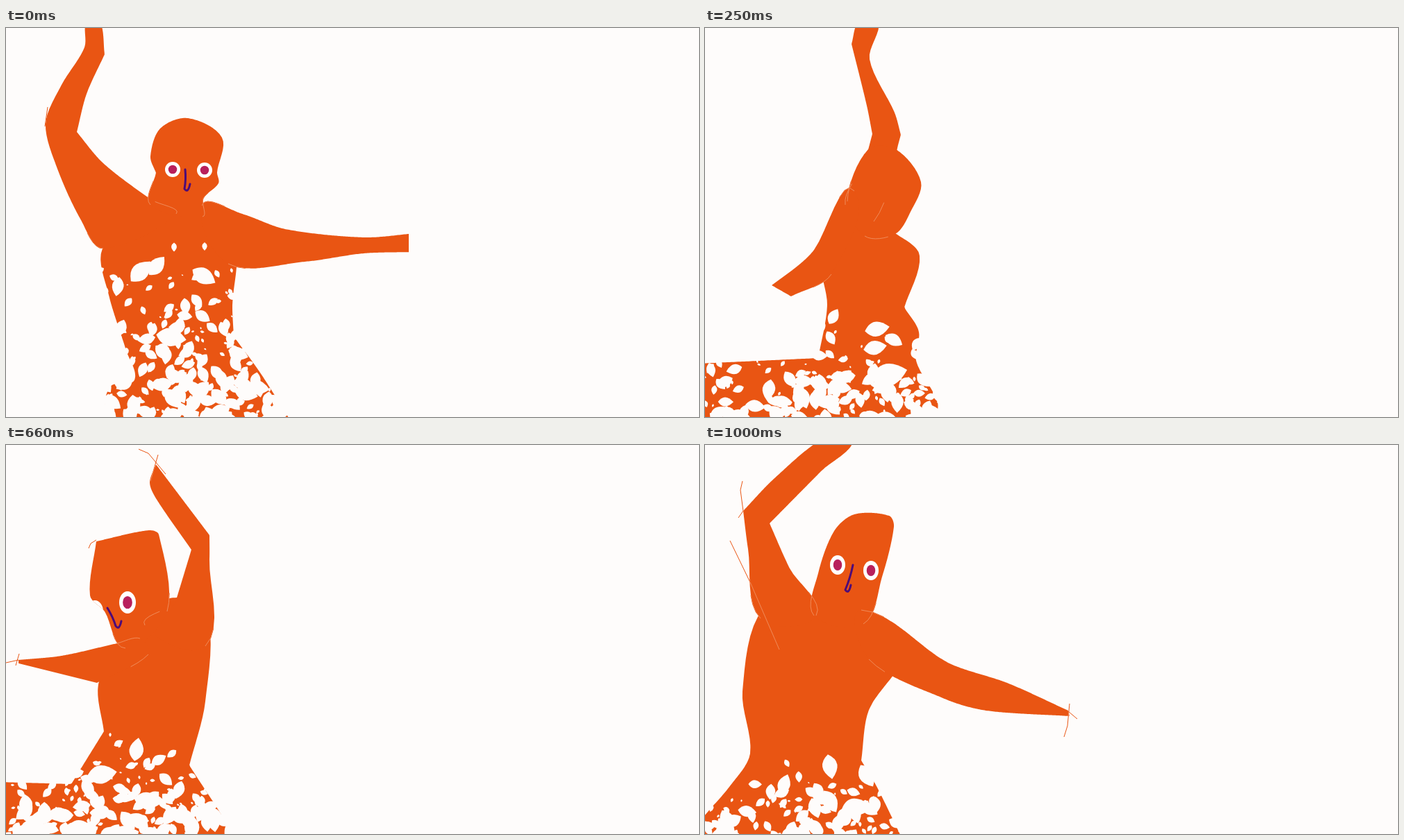
These frames come from a looping animation (998 by 561 pixels, 1.08 s). An HTML page with a canvas:

```html
<!DOCTYPE html>
<html lang="en">
<head>
<meta charset="utf-8">
<title>Turning dancer</title>
<style>
html, body { margin: 0; width: 100%; height: 100%; overflow: hidden; background: #fefcfb; }
canvas { display: block; }
</style>
</head>
<body>
<canvas id="stage" width="998" height="561"></canvas>
<script>
const ctx = document.getElementById('stage').getContext('2d');
const ORANGE = '#e95513', CREASE = '#f08a58', PURPLE = '#4d0b78', PINK = '#b8205c';
const LOOP = 1080, SAMPLES = 400;
const LIMBS = ['up', 'head', 'low'], PARTS = ['body', ...LIMBS];

// Start of each step, and its place between the poses below.
const STARTS = [0, 80, 160, 250, 330, 410, 500, 580, 660, 750, 830, 910, 1000];
const PLACES = [0, 1 / 2, 1, 2, 5 / 2, 3, 10 / 3, 11 / 3, 4, 13 / 3, 14 / 3, 5, 6];

const mix = (a, b, u) => a + (b - a) * u;
const gap = (a, b) => Math.hypot(b[0] - a[0], b[1] - a[1]);

// Reads "x y x y!"; a point marked "!" is doubled, which makes a corner.
function pairs(text) {
  const words = text.split(' '), out = [];
  for (let i = 0; i < words.length; i += 2) {
    const point = [parseFloat(words[i]), parseFloat(words[i + 1])];
    out.push(point);
    if (words[i + 1].endsWith('!')) out.push(point);
  }
  return out;
}

// Soft closed curve through the points, eight steps to a segment.
function curve(points) {
  const n = points.length, out = [];
  points.forEach((b, i) => {
    const a = points[(i + n - 1) % n], c = points[(i + 1) % n], d = points[(i + 2) % n];
    const reach = gap(b, c) * 0.3, ac = gap(a, c) || 1, bd = gap(b, d) || 1;
    for (let t = 0; t < 1; t += 1 / 8) {
      const s = 1 - t;
      out.push([0, 1].map(k => {
        const p = b[k] + (c[k] - a[k]) / ac * reach;
        const q = c[k] - (d[k] - b[k]) / bd * reach;
        return s * s * s * b[k] + 3 * s * s * t * p + 3 * s * t * t * q + t * t * t * c[k];
      }));
    }
  });
  return out;
}

// Evenly spaced points along a closed curve, so that two outlines can be blended.
function spread(points) {
  const ring = [...points, points[0]], far = [0], out = [];
  for (let i = 1; i < ring.length; i++) far.push(far[i - 1] + gap(ring[i - 1], ring[i]));
  for (let k = 0, i = 1; k < SAMPLES; k++) {
    const at = far[far.length - 1] * k / SAMPLES;
    while (far[i] < at) i++;
    const u = (at - far[i - 1]) / (far[i] - far[i - 1] || 1);
    out.push([mix(ring[i - 1][0], ring[i][0], u), mix(ring[i - 1][1], ring[i][1], u)]);
  }
  return out;
}

// Where a limb's open outline runs into the body it leaves a short pale stub.
function stubs(outline) {
  const open = outline.slice(0, -7), end = open[open.length - 1];
  const first = open.findIndex(p => gap(p, open[0]) > 36);
  const back = [...open].reverse();
  return [open.slice(0, first), back.slice(0, back.findIndex(p => gap(p, end) > 36))];
}

function random(seed) {
  return () => (seed = seed * 16807 % 2147483647) / 2147483647;
}

// The upper leaves are placed; the rest scatter, thicker and larger towards the hem.
function foliage(text, seed) {
  const flat = pairs(text), leaves = [], rand = random(seed);
  for (let i = 0; i < flat.length; i += 2) leaves.push([...flat[i], ...flat[i + 1]]);
  const top = Math.min(...leaves.map(leaf => leaf[1]));
  const count = (561 - top) * 1.8;
  for (let i = 0; i < count; i++) {
    const depth = Math.sqrt(rand());
    const size = (4 + 28 * rand() ** 1.5) * (0.6 + 0.6 * depth);
    leaves.push([420 * rand(), mix(top + 8, 565, depth), size, 180 * rand()]);
  }
  return leaves;
}

const poses = [];

// Outlines and hairs: x y. Leaves: x y length angle.
// Face: both eyes, eye radii, top and bottom of the nose.
function addPose({ face, hairs = [], leaves, ...outlines }) {
  const pose = { face: pairs(face), hairs: hairs.map(pairs) };
  pose.leaves = foliage(leaves, 9173 * (poses.length + 3));
  for (const part of PARTS) {
    const outline = curve(pairs(outlines[part]));
    pose[part] = spread(outline);
    if (part !== 'body') pose.hairs.push(...stubs(outline));
  }
  poses.push(pose);
}

addPose({
  body: '139 318 210 250 283 256 330 310 326 400 328 445! 366 497 412 570! 138 570! 150 517 185 508 173 465 148 385',
  up: '140 318 108 277 74 203 57 138 80 82 113 28 116 -10 135 -10 142 38! 116 95 102 150! 140 195 210 248 245 268',
  head: '208 255 216 209! 208 185 222 145 262 130 311 158 304 208 306 224 284 246 283 272',
  low: '282 256 340 268 402 290 515 302 590 296! 590 323! 515 325 430 337 320 340',
  face: '240 204 286 205 11 11 258 204 257 232',
  hairs: ['60 114 56 142'],
  leaves: '242 316 13 90 286 315 12 90 194 351 40 -45 217 343 34 -50 161 373 28 100 285 358 38 30 250 429 26 -80 238 446 44 10'
});
addPose({
  body: '152 200 222 233 273 264 302 305 314 355 304 372! 310 430 305 452! 350 505 398 570! 8 570! 5 518 75 509 130 487 165 448 166 400 157 310',
  up: '155 290 152 190 144 92! 160 -10 189 -10 183 70 182 160 196 228 222 235 240 290',
  head: '222 235 232 185 246 138 278 136 339 172 334 220 308 245 303 268 274 257! 240 290',
  low: '295 298 342 284 362 296 342 308 303 320',
  face: '360 200 385 200 8 11 366 202 370 233',
  leaves: '190 398 12 80 178 417 32 40 249 409 26 -55 255 438 27 -10 181 470 20 0 155 488 52 -10'
});
addPose({
  body: '205 250 274 296 309 328 287 403! 308 438 304 480 335 540 330 570! -10 570! -10 484! 163 476! 176 400 168 335',
  up: '202 255 229 195 241 153! 233 112 211 23! 222 -10 250 -10 237 45 273 122 282 154! 243 279',
  head: '205 250 235 175 275 175 311 222 296 265 274 297 230 300',
  low: '215 235 157 320 136 341 96 371! 124 387! 182 355',
  face: '20 210 60 210 8 11 40 210 42 240',
  leaves: '185 416 25 -60 181 447 22 60 248 434 36 -10 272 450 28 30 245 461 34 -10 265 500 54 -15'
});
addPose({
  body: '150 275 188 268 258 262 313 320 306 424! 279 495 310 570! -10 570! -10 509! 55 500 140 475 143 447 155 405 145 350',
  up: '235 260 260 234 340 163! 311 75! 277 39! 310 0! 318 38 362 112 384 155 366 205 313 320',
  head: '188 269 155 189! 213 153 231 166 260 220 258 267',
  low: '188 268 125 280 72 346! -10 361! -10 410! 65 402! 145 350',
  face: '20 210 60 210 8 11 40 210 42 240',
  leaves: '169 450 18 80 194 464 17 -50 206 466 20 100 264 472 26 70 224 495 30 40 190 508 40 -60'
});
addPose({
  body: '165 284 232 222 288 240 287 370 264 462! 325 558 325 570! -10 570! -10 486! 94 489! 141 413! 133 345',
  up: '200 260 243 230! 267 151! 216 77 207 54 216 28! 293 130! 293 165 287 290',
  head: '172 293 142 240 121 217 130 139! 205 123 220 129 232 240',
  low: '193 279 160 286 80 304 18 310! 18 315! 131 343! 205 302',
  face: '128 240 175 227 12 16 146 235 158 261',
  hairs: ['191 6 205 12 230 42', '219 14 208 52', '119 149 122 142 130 137', '0 314 18 310', '19 301 14 318'],
  leaves: '188 439 34 -80 162 430 15 -30 150 418 6 90 220 454 24 -30 138 475 44 -10 204 513 40 10'
});
addPose({
  body: '130 180 185 220 235 235 292 300 240 375 227 448! 296 530 308 570! -2 570! -2 545 62 463 84 424 106 328! 85 318! 117 255',
  up: '121 268 92 140 83 96! 139 25 165 17 239 15! 160 44 138 53 132 119! 210 250',
  head: '185 226 181 165 191 120 215 108 262 124! 257 175 234 257',
  low: '219 227 292 264 390 318 460 326 590 348! 590 380! 440 375 342 358 236 308',
  face: '198 167 242 174 9 14 218 161 212 194',
  leaves: '176 446 22 -60 165 457 17 60 196 464 14 90 235 478 26 60 160 484 28 -50 182 502 36 25'
});
addPose({
  body: '85 235 157 240 235 240 290 290 236 382 225 455! 247 492 285 570! -10 570! -10 548 35 493 65 445 54 355',
  up: '80 250 62 150 55 95! 100 48 172 -10 215 -10 168 37 93 113! 122 178 160 246',
  head: '157 246 163 185 186 124 215 100 265 102 272 118 255 190 228 258',
  low: '225 238 350 314 435 343 523 383! 525 391! 405 383 345 366 236 309',
  face: '191 173 239 181 11 14 213 173 202 209',
  hairs: ['36 138 66 200 107 295', '54 52 51 65 55 95 48 105', '525 373 522 405 517 421', '523 384 536 395'],
  leaves: '180 464 36 80 118 459 12 60 114 489 30 -70 180 514 36 60 233 477 36 60 215 521 38 -15'
});

function trace(points) {
  ctx.beginPath();
  for (const [x, y] of points) ctx.lineTo(x, y);
}

function drawLeaf([x, y, length, angle]) {
  const width = length * 0.6;
  ctx.save();
  ctx.translate(x, y);
  ctx.rotate(angle * Math.PI / 180);
  ctx.beginPath();
  ctx.moveTo(-length / 2, 0);
  ctx.quadraticCurveTo(-length * 0.08, -width, length / 2, 0);
  ctx.quadraticCurveTo(-length * 0.08, width, -length / 2, 0);
  ctx.fill();
  ctx.restore();
}

function drawFace([left, right, [rx, ry], [tx, ty], [bx, by]], head) {
  ctx.save();
  trace(head);
  ctx.clip();
  for (const [x, y] of [left, right]) {
    for (const [color, scale] of [['#fff', 1], [PINK, 0.57]]) {
      ctx.fillStyle = color;
      ctx.beginPath();
      ctx.ellipse(x, y, rx * scale, ry * scale, 0, 0, 7);
      ctx.fill();
    }
  }
  ctx.strokeStyle = PURPLE;
  ctx.lineWidth = 3;
  ctx.lineCap = ctx.lineJoin = 'round';
  ctx.beginPath();
  ctx.moveTo(tx, ty);
  ctx.quadraticCurveTo((tx + bx) / 2 + 2, (ty + by) / 2, bx, by);
  ctx.quadraticCurveTo(bx + 5, by + 7, bx + 8, by - 7);
  ctx.stroke();
  ctx.restore();
}

function draw(place) {
  const from = Math.floor(place), u = place - from;
  const a = poses[from], b = poses[Math.min(from + 1, poses.length - 1)];
  const near = poses[Math.round(place)];
  const blend = key => a[key].map(([x, y], i) => [mix(x, b[key][i][0], u), mix(y, b[key][i][1], u)]);

  ctx.clearRect(0, 0, 998, 561);
  ctx.save();
  ctx.beginPath();
  ctx.rect(0, 0, 580, 561);
  ctx.clip();

  ctx.fillStyle = ORANGE;
  for (const part of PARTS) {
    trace(blend(part));
    ctx.fill();
  }

  // Hairs are pale on the figure and orange where they leave it.
  if (!u) {
    ctx.lineWidth = 1;
    for (const [mode, color] of [['source-atop', CREASE], ['destination-over', ORANGE]]) {
      ctx.globalCompositeOperation = mode;
      ctx.strokeStyle = color;
      for (const hair of near.hairs) {
        trace(hair);
        ctx.stroke();
      }
    }
  }

  ctx.globalCompositeOperation = 'destination-out';
  near.leaves.forEach(drawLeaf);
  ctx.globalCompositeOperation = 'source-over';
  drawFace(blend('face'), blend('head'));
  ctx.restore();
}

let shown = -1;
function tick() {
  const time = performance.now() % LOOP;
  const step = STARTS.filter(start => start <= time).length - 1;
  if (step !== shown) draw(PLACES[shown = step]);
  requestAnimationFrame(tick);
}
tick();
</script>
</body>
</html>
```
